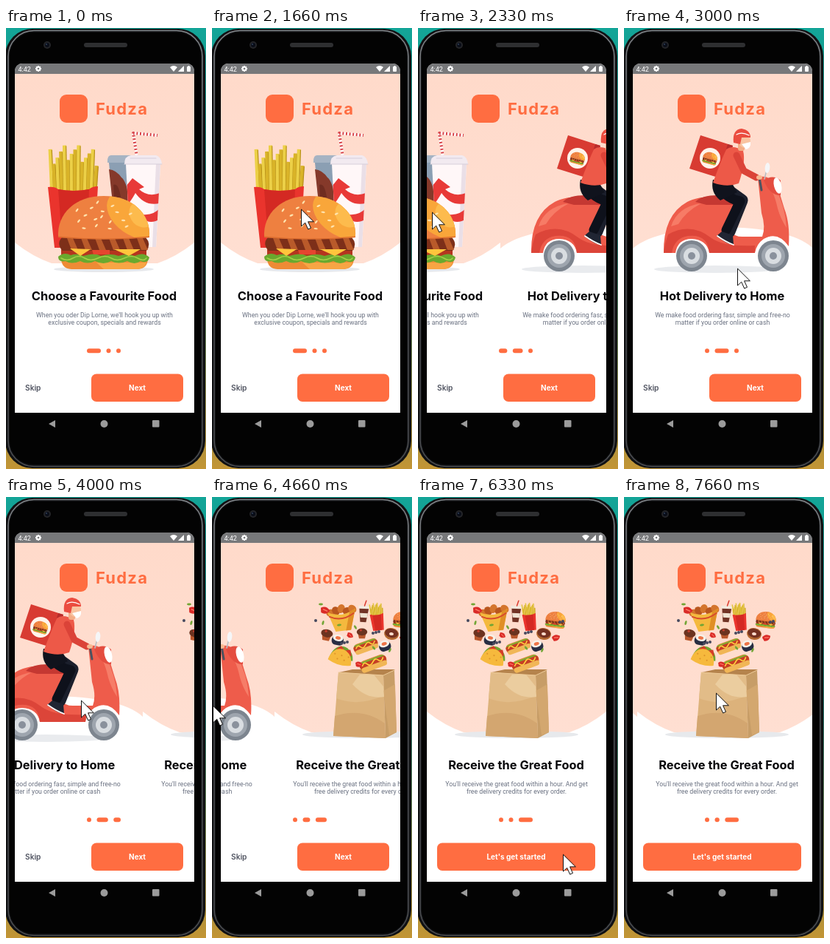
Recreate the animation shown at these times as an HTML page with a canvas. Size 272x596 px, loop 8 s.

```html
<!DOCTYPE html>
<html lang="en">
<head>
<meta charset="utf-8">
<title>Food app onboarding</title>
<style>
html, body { margin: 0; width: 100%; height: 100%; overflow: hidden; background: #000; }
canvas { display: block; width: 272px; height: 596px; }
</style>
</head>
<body>
<canvas id="stage"></canvas>
<script>
const W = 272, H = 596, LOOP = 8000, PAGE = 244;
const canvas = document.getElementById('stage');
const c = canvas.getContext('2d');
const dpr = window.devicePixelRatio || 1;
canvas.width = W * dpr;
canvas.height = H * dpr;

const ORANGE = '#ff6d41';
const SANS = 'Inter, "Open Sans", sans-serif';
const BODY = 'Roboto, Inter, sans-serif';

// start time, scroll, pointer x, pointer y
const steps = [
  [0, 0, -99, 0], [1000, 0, 271, 188], [1330, 0, 165, 243], [1660, 0, 121, 245],
  [2000, 50, 113, 248], [2330, 144, 19, 249], [2660, 234, 60, 290], [3000, 244, 154, 325],
  [3330, 244, 189, 264], [3660, 252, 164, 266], [4000, 314, 102, 275], [4330, 402, 14, 281],
  [4660, 415, 1, 282], [5000, 488, 120, 316], [5330, 488, 162, 314], [5660, 488, 72, 267],
  [6000, 488, 66, 265], [6330, 488, 197, 483], [6660, 488, 149, 496], [7000, 488, 138, 475],
  [7330, 488, 87, 272], [7660, 482, 125, 265]
];

function fill(color, d) { c.fillStyle = color; c.fill(new Path2D(d)); }
function line(color, width, d, cap = 'round') {
  c.strokeStyle = color; c.lineWidth = width; c.lineCap = cap; c.lineJoin = 'round';
  c.stroke(new Path2D(d));
}
function oval(color, x, y, rx, ry = rx, turn = 0) {
  c.fillStyle = color; c.beginPath(); c.ellipse(x, y, rx, ry, turn, 0, 7); c.fill();
}
function box(color, x, y, w, h, r = 0) {
  c.fillStyle = color; c.beginPath(); c.roundRect(x, y, w, h, r); c.fill();
}
function text(s, x, y, font, color, align = 'center') {
  c.font = font; c.fillStyle = color; c.textAlign = align; c.textBaseline = 'alphabetic';
  c.fillText(s, x, y);
}
function at(x, y, scale, turn, draw) {
  c.save(); c.translate(x, y); c.rotate(turn); c.scale(scale, scale); draw(); c.restore();
}
function clipTo(d, draw) { c.save(); c.clip(new Path2D(d)); draw(); c.restore(); }
function vertical(y0, y1, ...colors) {
  const g = c.createLinearGradient(0, y0, 0, y1);
  colors.forEach((k, i) => g.addColorStop(i / (colors.length - 1), k));
  return g;
}

function burger() {
  fill('#ee8b35', 'M-58 34H60Q60 48 46 49H-44Q-58 48-58 34Z');
  fill('#f8a544', 'M-10 40H58Q56 48 46 49H0Z');
  fill('#b5351f', 'M-58 20H58V36H-58Z');
  fill('#6aa92e', 'M-62 32Q-54 25-45 30Q-36 27-28 31Q-12 26-4 31Q10 27 20 31Q32 27 42 31Q54 25 62 33Q60 42 50 38Q42 44 32 38Q20 43 10 38Q0 44-12 38Q-22 43-32 38Q-44 43-52 38Q-62 40-62 32Z');
  line('#a3cf48', 1.6, 'M-58 34Q-50 39-42 34T-26 34T-8 34T10 34T28 34T46 34T58 34');
  fill('#7d2f19', 'M-57 6H57Q65 15 58 24H-56Q-65 15-57 6Z');
  for (let x = -50; x < 50; x += 19) fill('#b95a2a', `M${x} 7h8l7 16h-9Z`);
  fill('#ffc53c', 'M-46 21L-18 22L-32 31Z M14 22H50L34 31Z');
  fill('#e5452f', 'M-16 23H8V29H-14Z');
  const bun = 'M-62 6C-64-27-38-50 0-50C38-50 64-27 62 6Q0 11-62 6Z';
  fill('#ee8040', bun);
  clipTo(bun, () => {
    oval('#f9a63a', 42, -24, 42, 27, .6);
    oval('#fdbb4d', 52, -25, 19, 16, .8);
    line('#dc6c2d', 3, 'M-62 6Q0 12 62 6');
  });
  for (let i = 0; i < 17; i++) {
    const a = i * 2.4, r = Math.sqrt(i / 17);
    oval('#ffe3ae', -3 + 46 * r * Math.cos(a), -22 + 21 * r * Math.sin(a), 2.7, 1.2, -.9 + i % 3 * .5);
  }
}

function fries() {
  for (let i = 0; i < 14; i++) {
    const x = -29 + i * 4.4, top = -58 + (i * 7 % 4) * 7 + Math.abs(i - 6) * 1.3;
    const lean = (i - 6.5) * .45;
    line(i % 2 ? '#d9b328' : '#ecd047', 5, `M${x} 16L${x + lean} ${top}`, 'butt');
    line('#b68f18', 1.2, `M${x + 2.2} 16L${x + lean + 2.2} ${top + 1}`, 'butt');
  }
  fill('#ea342d', 'M-35 1Q-26 0-21 4Q0 8 21 4Q25 0 33 0L28 83H-26Z');
  fill('#d42923', 'M-21 4Q0 8 21 4L18 83H-15Z');
}

function backdrop(hill) {
  const low = hill ? 'V297C218 260 55 260 12 298Z' : 'V290Q232 309 206 318H62Q36 309 12 290Z';
  fill(vertical(62, 318, '#ffdaca', '#ffdfd2'), 'M12 62H256' + low);
}

function meal() {
  oval('#e6e8ec', 133, 326, 68, 4);
  fill('#a5b3c3', 'M138 180Q138 172 143 172H177L180 182H138Z');
  fill('#8b9fb3', 'M140 182H178L174 290H150Z');
  fill('#85392a', 'M140 191Q150 192 157 202Q163 206 168 230V290H151Z');
  fill('#6f2c20', 'M146 212Q154 208 157 236L160 290H151Z');
  line('#fff', 4, 'M178 174L173 142L206 145', 'butt');
  c.setLineDash([2, 2.6]);
  line('#d9454a', 4, 'M178 174L173 142L206 145', 'butt');
  c.setLineDash([]);
  const cup = 'M163 184H210L204 296H169Z';
  fill('#fff7f8', cup);
  clipTo(cup, () => {
    fill('#eadfe7', 'M204 184H212V296H199Z');
    fill('#e83a38', 'M158 220L172 203L188 215L181 218Q194 230 212 222V236Q190 243 176 223Q168 238 158 246Z');
    fill('#e83a38', 'M186 252Q202 254 212 240V256Q198 267 186 258Z');
  });
  fill('#f2eaf0', 'M161 184Q161 173 170 172H204Q211 174 212 184Z');
  line('#d8d0dc', 1.2, 'M161 184H212M169 176H204');
  at(92, 214, 1, 0, fries);
  at(133, 277, 1, 0, burger);
}

function wheel(x) {
  oval('#7d858f', x, 308, 21);
  oval('#9ea5ae', x, 308, 16);
  oval('#d9dde1', x, 308, 11);
  oval('#8a919c', x, 308, 5);
}

function scooter() {
  oval('#e9ebee', 124, 326, 83, 5);
  wheel(92);
  wheel(203);
  // delivery box
  fill('#d83b32', 'M104 145L148 159L134 204L89 190Z');
  fill('#b92c2b', 'M141 157L148 159L134 204L127 202Z');
  oval('#fff3eb', 117, 176, 14);
  at(117, 176, .16, .25, burger);
  // scooter body
  fill('#ee5c4b', 'M54 304Q53 253 86 235Q100 226 145 228L151 240Q140 254 146 275Q150 283 164 282H188Q193 269 187 250L182 202Q198 196 210 218L218 244Q226 264 224 295Q209 274 190 285Q180 292 178 304H116Q113 286 92 285Q73 285 70 304Z');
  fill('#dc4539', 'M116 304Q114 278 87 281Q68 284 65 304H54Q55 292 60 279Q91 262 119 284Q136 296 178 294V304Z');
  fill('#f77b66', 'M64 268Q72 242 105 237Q84 248 74 265Z');
  fill('#c53832', 'M97 235Q105 226 128 226L147 228L149 239H112Z');
  fill('#f67d68', 'M191 208Q203 216 209 244Q213 258 221 270Q219 239 205 215Z');
  line('#4c5360', 3, 'M187 219L184 202L176 201');
  fill('#e44d40', 'M190 206Q202 197 213 206L213 226Q199 227 190 206Z');
  oval('#fff', 209, 213, 5, 11, -.25);
  line('#b6bcc5', 1.5, 'M191 204L194 192');
  oval('#f5f6f8', 195, 189, 3.3, 7, .1);
  // rider
  line('#1b1f2c', 17, 'M132 213L160 233L143 275');
  line('#0e111b', 13, 'M129 215Q141 231 158 234L139 273');
  fill('#10131d', 'M121 205H144L154 222L131 233Q117 222 121 205Z');
  fill('#ed5948', 'M121 209Q130 184 139 164Q148 157 162 166Q166 181 156 210Q140 216 121 209Z');
  line('#db4338', 9, 'M153 172L163 193L180 202');
  oval('#f7b891', 184, 202, 4, 3);
  box('#f4ad86', 155, 154, 9, 12, 3);
  oval('#f9c4a1', 164, 153, 8, 9);
  fill('#fff', 'M160 157L172 154Q173 162 166 164Z');
  fill('#eb4c3f', 'M149 155Q147 137 160 136Q172 138 172 148L160 148L158 157Z');
  line('#fff', 1.2, 'M153 144Q160 140 170 145');
  fill('#202533', 'M133 275L148 280L149 293Q141 293 126 281Z');
  line('#fff', 1.8, 'M127 281Q138 289 149 293');
}

function hotdog() {
  box('#d98a35', -19, -7, 38, 15, 7);
  box('#7dae34', -18, -6, 36, 9, 4);
  box('#c63f25', -19, -4, 38, 7, 3);
  line('#ffd23e', 1.7, 'M-15-1Q-11-6-8-1T0-1T8-1T15-2');
  box('#f1b656', -18, 2, 36, 7, 4);
}
function taco() {
  fill('#6da52f', 'M-17 6Q-14-16 2-15Q15-12 17 2Z');
  fill('#d63c27', 'M-10-9L-4-15L3-10L10-13L14-4Z');
  fill('#f6b93d', 'M-18 8Q-15-11 0-11Q15-8 16 9Q0 15-18 8Z');
  for (let i = 0; i < 5; i++) oval('#dd922a', -10 + i * 5, i % 2 * 6 - 2, 1.1);
}
function sushi() {
  box('#272d42', -9, -6, 18, 14, 6);
  oval('#f6f2ea', 0, -3, 8, 5);
  oval('#ee7447', 0, -3, 4, 2.5);
}
function muffin() {
  fill('#b9572c', 'M-7 0H7L5 9H-5Z');
  oval('#6b3320', 0, -2, 9, 6);
  oval('#c13d2c', -2, -5, 2);
}
function tomato() {
  fill('#da2b28', 'M-7-3Q1-8 7 0Q2 8-6 4Z');
  line('#ff8169', 1.5, 'M-3-1L3 1');
}
function bucket() {
  for (let i = 0; i < 5; i++) oval(i % 2 ? '#b9571f' : '#d4752c', -14 + i * 7.5, -7 - i % 3 * 2, 6, 5, i);
  fill('#f4b93e', 'M-18-8Q0 2 20-9L11 19H-10Z');
  fill('#e08e26', 'M12-6L20-9L11 19H4Z');
  line('#d94a2c', 2, 'M-16-2Q0 7 17-3');
}
function soda() {
  fill('#713325', 'M-6-7H7L4 12H-4Z');
  box('#f2eadf', -7, -10, 15, 4, 1);
  line('#d93b2f', 1.5, 'M1-10L3-17');
  fill('#efe3d2', 'M-5 0H6L5 6H-4Z');
}
function donut() {
  oval('#b3672f', 0, 0, 10, 8);
  oval('#753121', 0, -1, 9, 6);
  oval('#ffdccd', 0, 0, 3, 2);
}

function bag() {
  oval('#e7e9ec', 134, 321, 84, 5);
  fill('#b5834c', 'M100 237L118 233H176L160 243Z');
  const food = [
    [103, 162, 1, -.12, bucket], [133, 157, 1, .05, soda], [151, 158, .27, -.1, fries],
    [187, 166, .22, .12, burger], [171, 185, 1, .2, donut], [136, 201, .9, -.35, hotdog],
    [98, 193, .9, .2, sushi], [162, 201, .9, -.3, sushi], [103, 216, .95, .25, taco],
    [146, 224, 1, -.35, hotdog], [131, 184, .8, 0, muffin], [83, 186, .9, .2, muffin],
    [81, 153, .9, .1, tomato], [188, 190, .8, -.4, tomato], [115, 187, .65, .5, tomato], [127, 226, .7, 0, tomato]
  ];
  for (const f of food) at(...f);
  for (let i = 0; i < 9; i++) oval('#46485e', 68 + i * 43 % 133, 167 + i * 29 % 43, 2);
  for (let i = 0; i < 6; i++) oval('#71a534', 75 + i * 47 % 116, 145 + i * 31 % 65, 3, 1.4, i);
  fill('#dcb27b', 'M99 237L160 241L163 326L92 323Z');
  fill('#c79d67', 'M160 241L175 234L178 318L163 326Z');
  fill('#e2bc88', 'M99 237L160 241L161 268Q126 284 96 272Z');
  fill('#d3a76f', 'M160 262L176 253L178 318L168 322Z');
  fill('#ebcd9f', 'M128 240H147L160 256L161 270Q137 274 118 253Z');
  fill('#d3a670', 'M94 296Q132 284 162 306L163 326L92 323Z');
  line('#eecb99', 1, 'M99 237L160 241L175 234');
}

const pages = [
  ['Choose a Favourite Food', "When you oder Dip Lorne, we'll hook you up with", 'exclusive coupon, specials and rewards', meal],
  ['Hot Delivery to Home', 'We make food ordering fasr, simple and free-no', 'matter if you order online or cash', scooter],
  ['Receive the Great Food', "You'll receive the great food within a hour. And get", 'free delivery credits for every order.', bag]
];

function drawPages(scroll) {
  clipTo('M12 62H256V420H12Z', () => {
    pages.forEach(([title, one, two, art], i) => {
      const x = i * PAGE - scroll;
      if (Math.abs(x) >= PAGE) return;
      c.save();
      c.translate(x, 0);
      backdrop(i === 1);
      art();
      text(title, 133.5, 368, '700 16.4px ' + SANS, '#07070a');
      text(one, 134, 391, '8.75px ' + BODY, '#697080');
      text(two, 134, 401.3, '8.75px ' + BODY, '#697080');
      c.restore();
    });
  });
}

function phone() {
  c.fillStyle = vertical(0, H, '#13a598', '#26756a', '#c29535');
  c.fillRect(0, 0, W, H);
  box('#101113', -1, 1, 272, 594, 37);
  c.strokeStyle = vertical(0, H, '#84878b', '#4c4e52', '#4c4e52');
  c.lineWidth = 1.5;
  c.beginPath(); c.roundRect(3, 3.5, 264, 589, 35); c.stroke();
  box('#030303', 5, 6, 260, 584, 32);
  box('#2e2f31', 106, 20, 59, 6, 3);
  oval('#242528', 56, 23, 5);
  oval('#090d18', 56, 23, 3);
  oval('#30405a', 55, 22, 1);
  box('#fff', 12, 48, PAGE, 472, [10, 10, 0, 0]);
  fill('#9b9b9b', 'M58 535L67 530V540Z');
  oval('#9b9b9b', 133.5, 535, 5);
  box('#9b9b9b', 199, 530, 9.5, 9.5, 1);
}

function statusBar() {
  box('#77787a', 12, 48, PAGE, 14, [10, 10, 0, 0]);
  text('4:42', 16.5, 58.5, '9px ' + BODY, '#fff', 'left');
  for (let i = 0; i < 4; i++) at(44, 55, 1, i * Math.PI / 4, () => box('#fff', -1, -4, 2, 8));
  oval('#fff', 44, 55, 3);
  oval('#77787a', 44, 55, 1.3);
  fill('#fff', 'M223 53Q228 49 233 53L228 59Z M242 51V59H234Z');
  box('#fff', 246, 52, 5, 7, 1);
  box('#fff', 247.5, 51, 2, 2);
}

function controls(scroll, last) {
  box(ORANGE, 73, 90, 38, 38, 9);
  c.letterSpacing = '1.2px';
  text('Fudza', 122, 117, '700 22px ' + SANS, ORANGE, 'left');
  c.letterSpacing = '0px';
  let x = 110;
  for (let i = 0; i < 3; i++) {
    const w = 6 + 13 * Math.max(0, 1 - Math.abs(scroll / PAGE - i));
    box(ORANGE, x, 433.2, w, 6, 3);
    x += w + 7.5;
  }
  const left = last ? 26 : 116;
  box(ORANGE, left, 467.5, 241 - left, 37.5, 7);
  text(last ? "Let's get started" : 'Next', (left + 241) / 2, 489.7, '700 10px ' + SANS, '#fff');
  if (!last) text('Skip', 26, 489.7, '600 10.2px ' + SANS, '#505461', 'left');
}

function pointer(x, y) {
  at(x, y, 1, 0, () => {
    const arrow = 'M.5 .5V23L5.7 18.2L9.7 27L13.5 25.3L9.6 16.8H17Z';
    fill('#fff', arrow);
    line('#111', 1, arrow);
  });
}

function draw(now) {
  const t = now % LOOP;
  const [start, scroll, x, y] = steps.findLast(s => s[0] <= t);
  c.setTransform(dpr, 0, 0, dpr, 0, 0);
  phone();
  drawPages(scroll);
  statusBar();
  controls(scroll, start >= 5330);
  pointer(x, y);
}

const begin = performance.now();
function tick() {
  draw(performance.now() - begin);
  requestAnimationFrame(tick);
}
tick();
</script>
</body>
</html>
```
